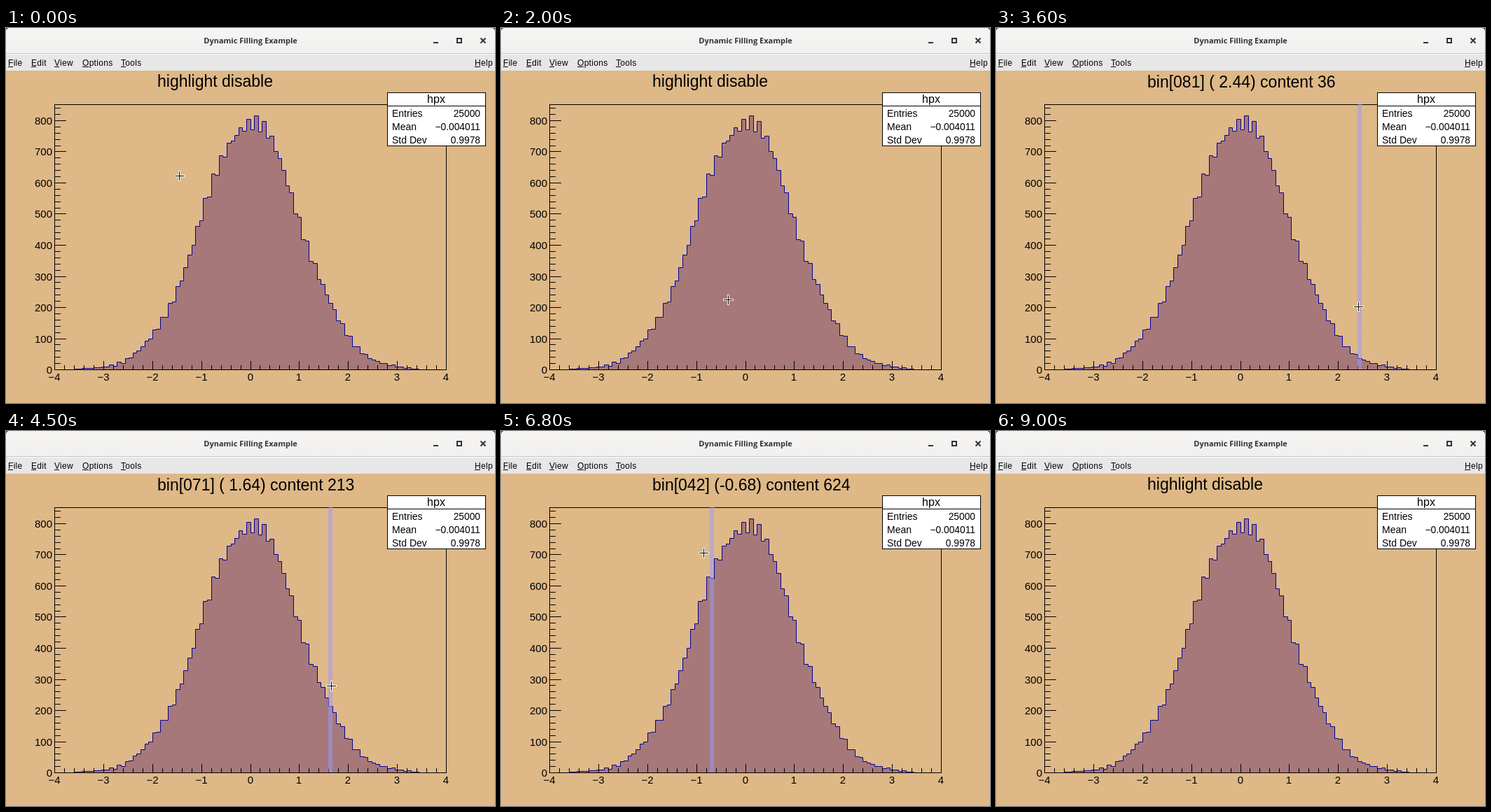
An HTML page with a canvas that plays this animation: 698x536 px, repeating every 9.5 s.

```html
<!DOCTYPE html>
<html lang="en">
<head>
<meta charset="utf-8">
<title>Histogram highlight</title>
<style>
html, body { margin: 0; width: 100%; height: 100%; overflow: hidden; background: #deb887; }
canvas { display: block; }
</style>
</head>
<body>
<canvas id="stage" width="698" height="536"></canvas>
<script>
const g = document.getElementById('stage').getContext('2d');
const LOOP = 9500, STEP = 100;
const BAR_LEAD = 55, TITLE_LEAD = 42, HOVER_LEAD = 180;
const SANS = '"Liberation Sans", Arial, sans-serif';
const BOX = { l: 69, t: 109, r: 628, b: 488 };
const BIN_W = (BOX.r - BOX.l) / 100;

// Pointer path: time, x, y
const path = [
  [0, 248, 211], [500, 293, 229], [600, 293, 229], [700, 290, 224], [1000, 290, 224],
  [1300, 293, 268], [1700, 325, 388], [2100, 325, 388], [2700, 397, 411], [3700, 520, 395],
  [4500, 465, 364], [4900, 425, 345], [5700, 234, 264], [6000, 198, 240], [6600, 222, 185],
  [6800, 290, 174], [7100, 328, 180], [7400, 285, 196], [7700, 315, 359], [7900, 315, 359],
  [8800, 238, 180]
];

const menus = [
  { from: 1000, to: 2000, x: 290, y: 224 },
  { from: 7400, to: 7900, x: 285, y: 195 }
];
const items = ['Add', 'Divide', 'DrawPanel', 'Fit', 'FitPanel', 'Multiply', 'Rebin', 'SetHighlight',
  'SetMaximum', 'SetMinimum', 'SetStats', 'ShowBackground', 'ShowPeaks', 'Smooth'];
const moreItems = ['SetName', 'SetTitle'];
const lastItems = ['Delete', 'DrawClass'];

const center = i => -4 + (i - 0.5) * 0.08;

// Normal curve with a ripple that scales like counting noise
function content(i) {
  const mean = 798 * Math.exp(-(center(i) ** 2) / 2);
  const ripple = 0.8 * Math.sin(Math.PI * (i - 46.5) / 12) * Math.cos(Math.PI * i)
    + 0.5 * Math.cos(Math.PI * (i - 56) / 8);
  return Math.max(0, Math.round(mean + ripple * Math.sqrt(mean)));
}

const binX = i => Math.round(BOX.l + (i - 1) * BIN_W);
const valueY = v => Math.round(488.04 - v * 0.4451);
const within = (t, a, b) => t >= a && t < b;

function slope(i, k) {
  const a = path[i - 1], b = path[i], c = path[i + 1];
  if (!a || !c || (b[k] - a[k]) * (c[k] - b[k]) <= 0) return 0;
  return (c[k] - a[k]) / (c[0] - a[0]);
}

// Cubic Hermite curve, flat at turning points
function pathAt(t, k) {
  const last = path.length - 1;
  if (t >= path[last][0]) return path[last][k];
  let i = 0;
  while (t >= path[i + 1][0]) i++;
  const p = path[i], q = path[i + 1], d = q[0] - p[0];
  const s = (t - p[0]) / d, s2 = s * s, s3 = s2 * s, h = 3 * s2 - 2 * s3;
  return p[k] + (q[k] - p[k]) * h
    + d * ((s - 2 * s2 + s3) * slope(i, k) + (s3 - s2) * slope(i + 1, k));
}

const binAt = t => Math.floor((pathAt(Math.min(t, 7300), 1) - BOX.l) / BIN_W) + 1;

function rect(x, y, w, h, color) {
  g.fillStyle = color;
  g.fillRect(x, y, w, h);
}

function frame(x, y, w, h, color) {
  g.strokeStyle = color;
  g.lineWidth = 1;
  g.strokeRect(x + 0.5, y + 0.5, w, h);
}

function text(str, x, y, size, align = 'left', weight = '', family = SANS, color = '#000') {
  g.font = `${weight} ${size}px ${family}`;
  g.textAlign = align;
  g.fillStyle = color;
  g.fillText(str, x, y);
}

function label(str, x, y, underline) {
  g.letterSpacing = '0.3px';
  text(str, x, y, 12);
  if (underline) rect(x, y + 1, Math.round(g.measureText(str[0]).width) - 1, 1, '#000');
  g.letterSpacing = '0px';
}

function drawWindow() {
  const bar = g.createLinearGradient(0, 0, 0, 36);
  bar.addColorStop(0, '#f6f5f4');
  bar.addColorStop(1, '#f0f0ef');
  rect(0, 0, 698, 36, bar);
  for (const side of [0, 1]) {
    rect(side * 695, 0, 3, 1, '#29527a');
    rect(side * 697, 1, 1, 2, '#29527a');
  }
  rect(0, 36, 698, 1, '#c3c3c2');
  text('Dynamic Filling Example', 349, 22, 11, 'center', 'bold', '"Open Sans", sans-serif', '#2e3436');
  rect(610, 20, 7, 2, '#2e3436');
  g.strokeStyle = '#2e3436';
  g.lineWidth = 2;
  g.strokeRect(644, 15, 6, 6);
  g.beginPath();
  g.moveTo(677.5, 14.5); g.lineTo(684.5, 21.5);
  g.moveTo(684.5, 14.5); g.lineTo(677.5, 21.5);
  g.stroke();

  rect(0, 37, 698, 24, '#e7e7e7');
  rect(0, 37, 698, 1, '#fff');
  const names = { File: 3, Edit: 36, View: 69, Options: 109, Tools: 164, Help: 669 };
  for (const name in names) label(name, names[name], 54, true);
}

function drawHistogram() {
  g.beginPath();
  g.moveTo(BOX.l + 0.5, BOX.b + 0.5);
  for (let i = 1; i <= 100; i++) {
    const y = valueY(content(i)) + 0.5;
    g.lineTo(binX(i) + 0.5, y);
    g.lineTo(binX(i + 1) + 0.5, y);
  }
  g.fillStyle = '#a67879';
  g.fill();
  g.strokeStyle = '#000099';
  g.lineWidth = 1;
  g.stroke();
}

function drawAxes() {
  frame(BOX.l, BOX.t, BOX.r - BOX.l, BOX.b - BOX.t, '#000');
  for (let v = 0; v <= 840; v += 20) {
    const major = v % 100 === 0, y = valueY(v);
    rect(BOX.l, y, major ? 17 : 9, 1, '#000');
    if (major) text(v, 66, y + 6, 15, 'right');
  }
  for (let i = 0; i <= 40; i++) {
    const major = i % 5 === 0, x = Math.round(BOX.l + i * 13.975), n = i / 5 - 4;
    const len = major ? 12 : 6;
    rect(x, BOX.b - len, 1, len, '#000');
    if (major) text(n < 0 ? '\u2212' + -n : n, x, 504, 15, 'center');
  }
}

function drawStats() {
  rect(544, 92, 141, 77, '#fff');
  frame(544, 92, 140, 76, '#000');
  rect(544, 111, 141, 1, '#000');
  text('hpx', 614, 107, 16, 'center');
  [['Entries', '25000'], ['Mean', '\u22120.004011'], ['Std Dev', '0.9978']].forEach(([name, value], i) => {
    text(name, 551, 127 + 19 * i, 14);
    text(value, 677, 126.5 + 19 * i, 13.8, 'right');
  });
}

const checker = (() => {
  const c = document.createElement('canvas');
  c.width = c.height = 2;
  const p = c.getContext('2d');
  p.fillStyle = '#9999ff';
  p.fillRect(0, 0, 1, 1);
  p.fillRect(1, 1, 1, 1);
  return g.createPattern(c, 'repeat');
})();

function drawHighlight(t) {
  if (!within(t, 2200, 8000)) {
    text('highlight disable', 216, 84, 23);
    return;
  }
  const bar = binAt(t + BAR_LEAD), x = binX(bar);
  rect(x, BOX.t, binX(bar + 1) - x, BOX.b - BOX.t, checker);
  const n = binAt(t + TITLE_LEAD);
  const id = String(n).padStart(3, '0'), mid = center(n).toFixed(2).padStart(5);
  text(`bin[${id}] (${mid}) content ${content(n)}`, 216, 85, 23);
}

function drawMenu(m, t) {
  const { x, y } = m, w = 156;
  rect(x, y, w + 1, 540, '#e7e7e7');
  rect(x, y, w, 1, '#8c8c8c');
  rect(x, y, 1, 540, '#8c8c8c');
  rect(x + 1, y + 1, w - 2, 1, '#fff');
  rect(x + 1, y + 1, 1, 540, '#fff');
  rect(x + w - 1, y + 1, 1, 540, '#9a9a9a');
  rect(x + w, y, 1, 540, '#444');

  const line = dy => {
    rect(x + 2, y + dy, w - 4, 1, '#8c8c8c');
    rect(x + 2, y + dy + 1, w - 4, 1, '#fff');
  };
  text('TH1F::hpx', x + 26, y + 16, 12, 'left', 'bold');
  [22, 26, 282, 324].forEach(line);

  const row = Math.floor((pathAt(Math.min(t + HOVER_LEAD, m.to - 1), 2) - y - 29) / 18);
  if (row >= 0 && row < items.length) {
    const top = y + 28 + row * 18;
    rect(x + 3, top, 151, 18, '#cecece');
    frame(x + 3, top, 150, 17, '#8a8a8a');
    label('?', x + 145, top + 14, true);
  }
  const list = (names, dy) => names.forEach((s, i) => label(s, x + 18, y + dy + 18 * i));
  list(items, 42);
  list(moreItems, 298);
  list(lastItems, 340);
}

function drawCross(x, y) {
  const cx = Math.round(x) - 1, cy = Math.round(y);
  rect(cx - 7, cy - 1, 15, 3, '#fff');
  rect(cx - 1, cy - 7, 3, 15, '#fff');
  rect(cx - 6, cy, 13, 1, '#000');
  rect(cx, cy - 6, 1, 13, '#000');
}

function drawArrow(x, y) {
  g.save();
  g.translate(Math.round(x) + 0.5, Math.round(y) + 0.5);
  g.beginPath();
  g.moveTo(0, 0);
  g.lineTo(0, 15); g.lineTo(3.5, 12); g.lineTo(6, 18);
  g.lineTo(8.5, 17); g.lineTo(6, 11); g.lineTo(10, 11);
  g.closePath();
  g.fillStyle = '#111';
  g.fill();
  g.strokeStyle = '#fff';
  g.lineWidth = 1;
  g.stroke();
  g.restore();
}

function drawPointer(t) {
  if (t >= 9000) return;
  if (t >= 8900) return drawArrow(50, 25);
  const arrow = within(t, 700, 2000) || within(t, 7400, 7900);
  (arrow ? drawArrow : drawCross)(pathAt(t, 1), pathAt(t, 2));
}

function draw(now) {
  const t = Math.floor((now % LOOP) / STEP) * STEP;
  rect(0, 61, 698, 475, '#deb887');
  drawWindow();
  drawHistogram();
  drawAxes();
  drawHighlight(t);
  drawStats();
  menus.filter(m => within(t, m.from, m.to)).forEach(m => drawMenu(m, t));
  drawPointer(t);
}

const start = performance.now();
function tick() {
  draw(performance.now() - start);
  requestAnimationFrame(tick);
}
tick();
</script>
</body>
</html>
```
